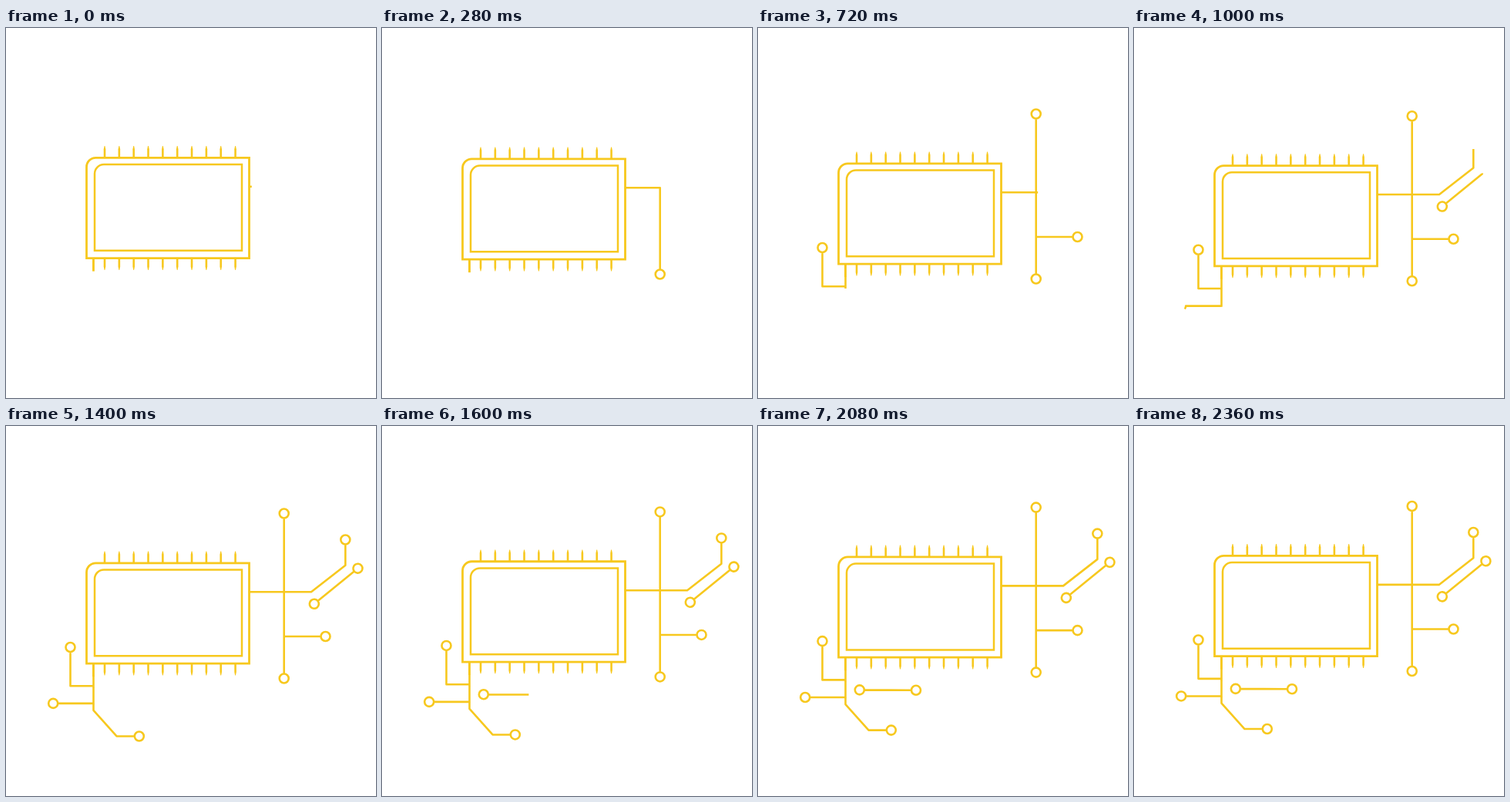
These frames come from a looping animation (480 px wide and 480 px high, 2400 ms). An HTML page with a canvas:

```html
<!DOCTYPE html>
<html lang="en">
<head>
<meta charset="utf-8">
<title>Circuit</title>
<style>
  html, body { margin: 0; width: 100%; height: 100%; overflow: hidden; background: #fff; }
  canvas { display: block; width: 480px; height: 480px; }
</style>
</head>
<body>
<canvas id="stage" width="480" height="480"></canvas>
<script>
const ctx = document.getElementById('stage').getContext('2d');
const LOOP = 2400, STEP = 40, RING = 6;
const GOLD = '#f7c81e';

// A trace runs through its points; rings sit on the first and/or last point.
function makeTrace(start, end, points, { head = false, tail = true } = {}) {
  const pts = points.map(([x, y]) => ({ x, y }));
  const path = new Path2D();
  const last = pts.length - 1;
  const angle = (a, b) => Math.atan2(b.y - a.y, b.x - a.x);
  const onRing = (c, a) => ({ x: c.x + RING * Math.cos(a), y: c.y + RING * Math.sin(a) });
  const headAngle = angle(pts[0], pts[1]);
  const tailAngle = angle(pts[last], pts[last - 1]);
  const headCentre = pts[0], tailCentre = pts[last];
  let length = 0;

  if (head) {
    pts[0] = onRing(headCentre, headAngle);
    path.arc(headCentre.x, headCentre.y, RING, headAngle, headAngle + 2 * Math.PI);
    length += 2 * Math.PI * RING;
  } else {
    path.moveTo(pts[0].x, pts[0].y);
  }
  if (tail) pts[last] = onRing(tailCentre, tailAngle);
  for (let i = 1; i <= last; i++) {
    path.lineTo(pts[i].x, pts[i].y);
    length += Math.hypot(pts[i].x - pts[i - 1].x, pts[i].y - pts[i - 1].y);
  }
  if (tail) {
    path.arc(tailCentre.x, tailCentre.y, RING, tailAngle, tailAngle + 2 * Math.PI);
    length += 2 * Math.PI * RING;
  }
  return { start, end, path, length };
}

const traces = [
  makeTrace(-4, 265, [[316, 205.8], [360.7, 205.8], [360.7, 318]]),
  makeTrace(290, 540, [[360.7, 206], [360.7, 104]]),
  makeTrace(300, 550, [[361, 263.5], [414.5, 263.5]]),
  makeTrace(285, 345, [[113.5, 315], [113.5, 330.5]], { tail: false }),
  makeTrace(340, 550, [[113.5, 327.8], [83.5, 327.8], [83.5, 277.5]]),
  makeTrace(714, 1100, [[360.7, 205.8], [396, 205.8], [440.3, 171.3], [440.3, 138]]),
  makeTrace(740, 1100, [[399.8, 221.3], [456.4, 175.2]], { head: true }),
  makeTrace(730, 860, [[113.5, 330], [113.5, 351.5]], { tail: false }),
  makeTrace(850, 1100, [[113.5, 350.4], [61.2, 350.4]]),
  makeTrace(1110, 1350, [[113.5, 351], [113.5, 359.5], [143.5, 393], [172.8, 393]]),
  makeTrace(1430, 1690, [[131.8, 340.8], [205, 341.2]], { head: true })
];

function drawFrame(left, top, right, bottom, width) {
  const radius = 12;
  ctx.lineWidth = width;
  ctx.beginPath();
  ctx.moveTo(right, top);
  ctx.lineTo(right, bottom);
  ctx.lineTo(left, bottom);
  ctx.lineTo(left, top + radius);
  ctx.arcTo(left, top, left + radius, top, radius);
  ctx.closePath();
  ctx.stroke();
}

function drawPin(x, base, dir) {
  ctx.beginPath();
  ctx.moveTo(x - 1.3, base);
  ctx.lineTo(x - 1.3, base + dir * 11);
  ctx.lineTo(x - 0.4, base + dir * 15.3);
  ctx.lineTo(x + 0.4, base + dir * 15.3);
  ctx.lineTo(x + 1.3, base + dir * 11);
  ctx.lineTo(x + 1.3, base);
  ctx.fill();
}

function drawChip() {
  ctx.lineJoin = 'miter';
  drawFrame(104.5, 168.3, 315.5, 298.6, 2.8);
  drawFrame(115, 177, 306, 288.8, 2.5);
  for (let i = 0; i < 10; i++) {
    const x = 128 + i * 18.84;
    drawPin(x, 168.3, -1);
    drawPin(x, 298.6, 1);
  }
  ctx.fillRect(112, 298.6, 2.9, 17);
}

function drawTrace({ start, end, path, length }, t) {
  const shown = Math.min(1, (t - start) / (end - start));
  if (shown <= 0) return;
  ctx.setLineDash(shown < 1 ? [length * shown, length * 2] : []);
  ctx.stroke(path);
}

// The drawing sinks a little faster than it rises again.
function bob(t) {
  const peak = 1133, depth = 10.6;
  const level = t < peak ? t / peak : (LOOP - t) / (LOOP - peak);
  return depth * (1 - Math.cos(Math.PI * level)) / 2;
}

function render(now) {
  const t = Math.floor((now % LOOP) / STEP) * STEP;
  ctx.setTransform(1, 0, 0, 1, 0, 0);
  ctx.fillStyle = '#fff';
  ctx.fillRect(0, 0, 480, 480);
  ctx.translate(0, bob(t));
  ctx.fillStyle = ctx.strokeStyle = GOLD;
  ctx.setLineDash([]);
  drawChip();
  ctx.lineJoin = 'round';
  ctx.lineWidth = 2.6;
  traces.forEach(trace => drawTrace(trace, t));
}

const begin = performance.now();
function tick() {
  render(performance.now() - begin);
  requestAnimationFrame(tick);
}
tick();
</script>
</body>
</html>
```
